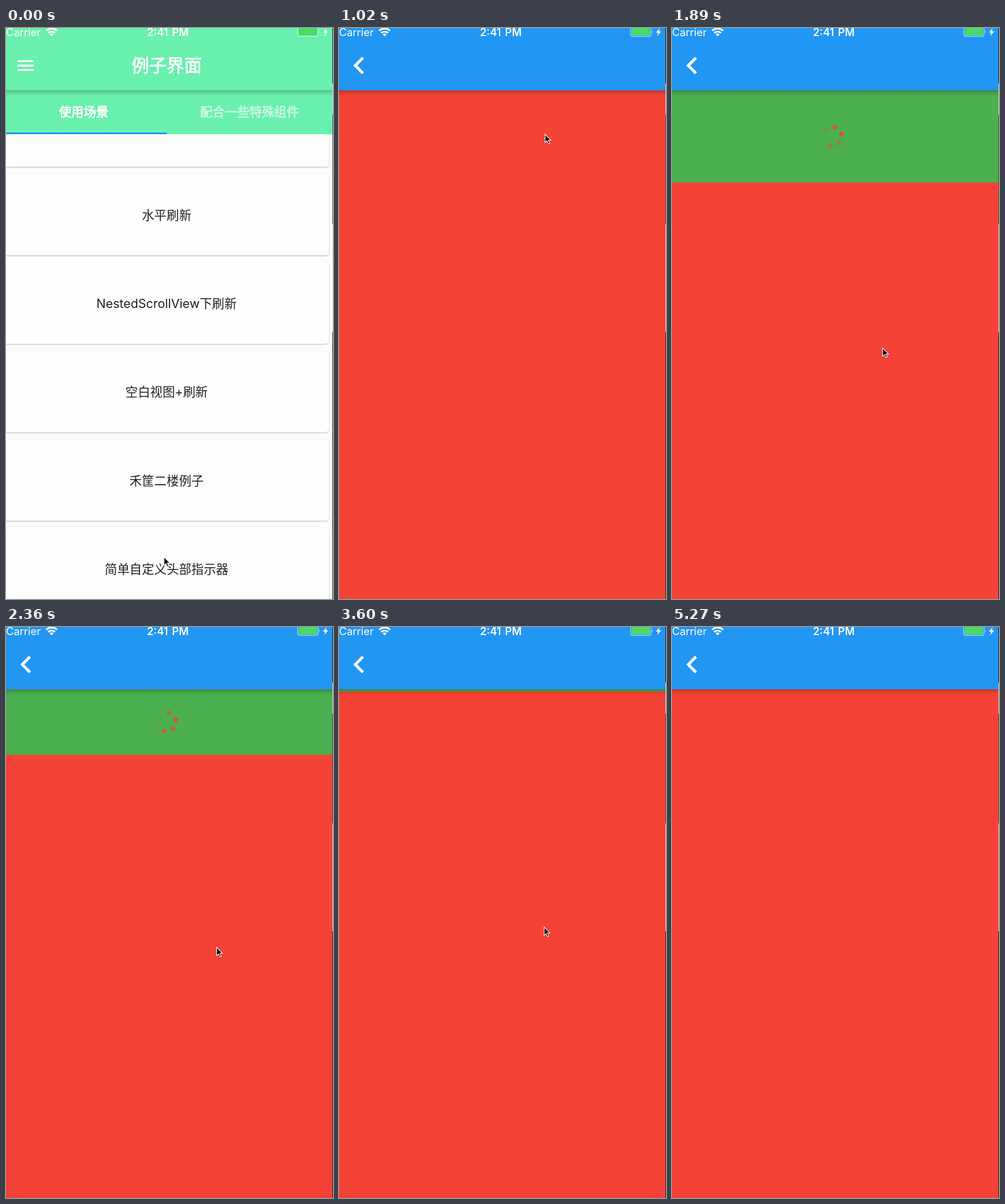
Recreate the animation shown at these times as an HTML page. Size 566 px wide and 989 px high, loop 5370 ms.

```html
<!DOCTYPE html>
<html lang="zh">
<head>
<meta charset="utf-8">
<title>例子界面</title>
<style>
  html, body { margin: 0; width: 100%; height: 100%; overflow: hidden; background: #fdfdfd; }
  #stage { display: block; width: 566px; height: 989px; }
  text { font-family: Inter, "Noto Sans CJK SC", "Noto Sans CJK", sans-serif; fill: #fff; }
  .mid { text-anchor: middle; }
  .medium { font-weight: 500; stroke: #fff; stroke-width: .8px; }
  .card rect { fill: #fefefe; filter: drop-shadow(0 1.5px 1px rgba(0,0,0,.3)); }
  .card text { fill: #212121; font-size: 21.4px; }
  .status { font-size: 18.4px; }
  #cursor { filter: drop-shadow(0 1px 1px rgba(0,0,0,.25)); }
</style>
</head>
<body>
<svg id="stage" viewBox="0 0 566 989" xmlns="http://www.w3.org/2000/svg">
  <defs>
    <linearGradient id="below" x2="0" y2="1">
      <stop offset="0" stop-opacity=".24"/>
      <stop offset=".4" stop-opacity=".1"/>
      <stop offset="1" stop-opacity="0"/>
    </linearGradient>
    <linearGradient id="beside">
      <stop offset="0" stop-opacity="0"/>
      <stop offset=".6" stop-opacity=".07"/>
      <stop offset="1" stop-opacity=".22"/>
    </linearGradient>
  </defs>

  <g id="list">
    <rect x="-10" width="576" height="989" fill="#fdfdfd"/>
    <g id="cards"></g>
    <rect x="-10" width="576" height="184" fill="#69f0ae"/>
    <rect x="-10" y="107.9" width="576" height="10" fill="url(#below)"/>
    <path d="M20 57.4h28m-28 7.7h28m-28 7.6h28" stroke="#fff" stroke-width="3.1"/>
    <text class="mid medium" x="278" y="76" font-size="30.4">例子界面</text>
    <text class="mid medium" x="134.5" y="152.5" font-size="21.4">使用场景</text>
    <text class="mid medium" x="421.5" y="152.5" font-size="21.4" opacity=".65">配合一些特殊组件</text>
    <rect x="-10" y="181" width="288" height="3" fill="#2196f3"/>
  </g>

  <g id="page">
    <rect x="-38.4" width="28.8" height="989" fill="url(#beside)"/>
    <rect x="-9.6" width="576" height="989" fill="#f44336"/>
    <svg id="head" x="-9.6" y="107.9" width="576" height="0">
      <rect width="576" height="400" fill="#4caf50"/>
      <g id="spinner"></g>
    </svg>
    <rect x="-9.6" y="107.9" width="576" height="10" fill="url(#below)"/>
    <rect x="-9.6" width="576" height="107.9" fill="#2196f3"/>
    <path d="M41.5 51.5 28.2 65l13.300 13.500" fill="none" stroke="#fff" stroke-width="5"/>
  </g>

  <text class="status" x="0" y="13.5">Carrier</text>
  <path d="M69.5 4.8a13.6 13.6 0 0 1 19 0M73 8.6a8.6 8.6 0 0 1 12 0" fill="none" stroke="#fff" stroke-width="3"/>
  <path d="M79 14.5 75.6 11a4.8 4.8 0 0 1 6.8 0z" fill="#fff"/>
  <text class="status mid" x="280" y="13.5" font-weight="600" word-spacing="2">2:41 PM</text>
  <rect x="504.7" y="-2" width="35.6" height="16.5" rx="3.5" fill="none" stroke="#fff" stroke-opacity=".55" stroke-width="1.4"/>
  <rect x="506.5" y="0" width="32" height="13" rx="1.5" fill="#4cd964"/>
  <path d="M542 4q2.4 2.5 0 5z" fill="#fff" fill-opacity=".6"/>
  <path d="M555 0 548.5 8h4L550.5 14 558 5.8h-4.3z" fill="#fff"/>

  <g id="edge">
    <path d="M565 0h1v989h-1z" fill="#1a1a1a"/>
    <path d="M565 150h1v190h-1z" fill="#484848"/>
    <path d="M565 96h1v54h-1zM565 340h1v187h-1z" fill="#d2d2d0"/>
  </g>

  <path id="cursor" d="M.6 1V16.4L4.2 13 6.7 18.7 9.2 17.6 6.8 12H11.6Z" stroke="#fff" stroke-width="1.2"/>
</svg>

<script>
const LOOP = 5370, WIDTH = 575, REST = 92, FULL = 122.7;
const OPEN = 170, PULL = 1000, RELEASE = 2200, DONE = 3420, NUDGE = 3720, LET_GO = 4280, END = 4560;
const SVG = 'http://www.w3.org/2000/svg';
const $ = id => document.getElementById(id);

function add(parent, tag, attrs, text) {
  const el = document.createElementNS(SVG, tag);
  for (const k in attrs) el.setAttribute(k, attrs[k]);
  if (text) el.textContent = text;
  return parent.appendChild(el);
}

['', '水平刷新', 'NestedScrollView下刷新', '空白视图+刷新', '禾筐二楼例子', '简单自定义头部指示器']
  .forEach((label, i) => {
    const y = 99.5 + i * 153.25;
    const card = add($('cards'), 'g', { class: 'card' });
    add(card, 'rect', { x: -4, y, width: 563, height: 141, rx: 6 });
    add(card, 'text', { class: 'mid', x: 278, y: y + 79 }, label);
  });

// Six red squares in a ring, each a fifth of a turn out of phase; the first two agree.
const squares = Array.from({ length: 6 }, (_, i) => ({
  lag: -i / 5,
  el: add($('spinner'), 'rect', {
    x: 8.05, y: 8.05, width: 6.9, height: 6.9, fill: '#f44336', transform: `rotate(${60 * i})`
  })
}));
squares.forEach((s, i) => { s.lag = i ? (6 - i) / 5 : 0; });

// Pointer moves: start, end, dx, dy.
const moves = [
  [OPEN, 290, -3.5, -6.5],
  [440, PULL, 87, -728.5],
  [PULL, 1900, 7.5, 373.5],
  [3000, 3550, -9.5, -35],
  [NUDGE, 4240, 6, 41]
];

function smooth(t, start, end) {
  const u = Math.min(1, Math.max(0, (t - start) / (end - start)));
  return u * u * (3 - 2 * u);
}

function pointer(t) {
  let x = 273.5, y = 916;
  for (const [start, end, dx, dy] of moves) {
    const p = smooth(t, start, end);
    x += dx * p;
    y += dy * p;
  }
  return { x, y };
}

// The screen opens in two jumps, then everything advances in steps of 60 ms.
function clock(t) {
  if (t < OPEN) return 0;
  if (t < 440) return t < 290 ? OPEN : 290;
  return Math.max(440, Math.floor((t - 20) / 60) * 60 + 20);
}

// Overscroll resistance: the further the pull, the less it gives.
function pull(distance) {
  const d = 0.52 * Math.max(0, distance);
  return d / (1 + d / 900);
}

const settle = (from, to, age, tau) => to + (from - to) * Math.exp(-age / tau);

function headHeight(t) {
  const dragged = since => pull(pointer(t).y - pointer(since).y);
  if (t < PULL) return 0;
  if (t < RELEASE) return dragged(PULL);
  if (t < DONE) return settle(pull(373.5), REST, t - RELEASE, 140);
  if (t < NUDGE) return settle(REST, 0, t - DONE, 45);
  if (t < LET_GO) return dragged(NUDGE);
  return t < END ? settle(pull(41), 0, t - LET_GO, 60) : 0;
}

function draw(now) {
  const t = clock(now % LOOP);

  const opened = t >= OPEN;
  const shift = opened ? WIDTH * Math.exp((125 - t) / 75) : WIDTH;
  $('page').setAttribute('visibility', opened ? 'visible' : 'hidden');
  $('page').setAttribute('transform', `translate(${shift})`);
  $('list').setAttribute('transform', `translate(${(shift - WIDTH) / 3})`);

  const { x, y } = pointer(t);
  $('cursor').setAttribute('transform', `translate(${x - .5} ${y - .5}) scale(.93)`);
  $('cursor').setAttribute('visibility', t < END - 20 ? 'visible' : 'hidden');

  const h = headHeight(t);
  const refreshing = t >= RELEASE && t < DONE;
  const scale = refreshing ? 1 : Math.min(1, h / FULL);
  const phase = refreshing ? (t - RELEASE) / 2000 : 0;
  $('head').setAttribute('height', h);
  $('spinner').setAttribute('transform', `translate(287.5 ${h / 2}) scale(${scale})`);
  for (const { el, lag } of squares)
    el.setAttribute('opacity', (Math.sin(2 * Math.PI * (phase + lag)) + 1) / 2);

  requestAnimationFrame(() => draw(performance.now() - begin));
}

const begin = performance.now();
draw(0);
</script>
</body>
</html>
```
